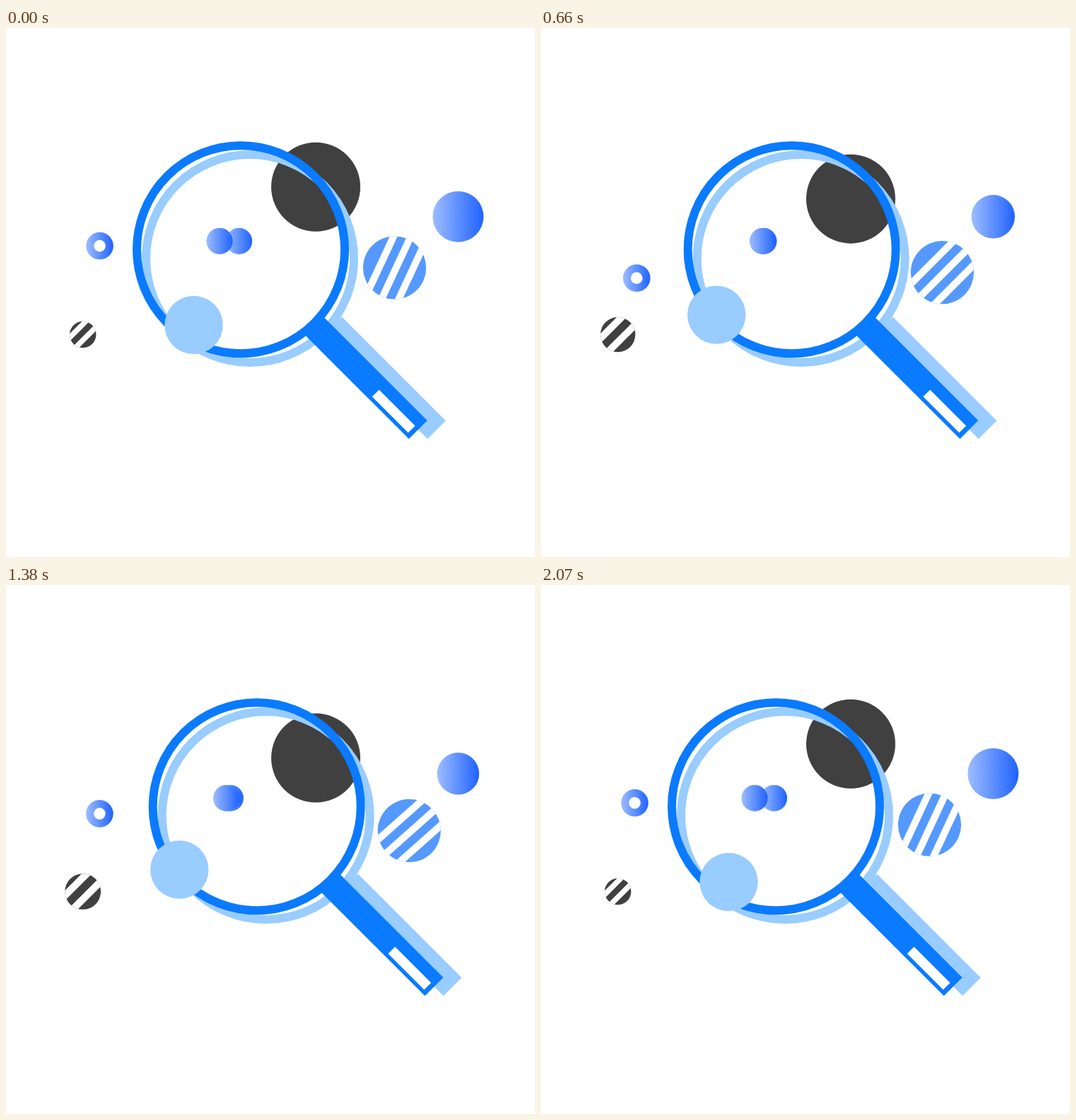
Recreate the animation shown at these times as an HTML page with a canvas. Size 748 px wide and 748 px high, loop 2.1 s.

```html
<!DOCTYPE html>
<html>
<head>
<meta charset="utf-8">
<style>
  html, body { margin: 0; width: 100%; height: 100%; overflow: hidden; background: #fff; }
  canvas { display: block; }
</style>
</head>
<body>
<canvas id="stage" width="748" height="748"></canvas>
<script>
const ctx = document.getElementById('stage').getContext('2d');
const LOOP = 2100, STEP = 30, RAD = Math.PI / 180;
const BLUE = '#0a7aff', LIGHT = '#99ccff', DARK = '#404040', STRIPE = '#5599ff';

const smooth = s => s * s * (3 - 2 * s);
const soft = s => s + s * s - s * s * s; // steady start, gentle arrival

// 0 -> 1 until `up`, holds until `down`, back to 0 at `end`
function pulse(t, up, down, end, ease) {
  const s = Math.min(t / up, (end - t) / (end - down));
  return ease(Math.max(0, Math.min(1, s)));
}

function disc(x, y, r, fill) {
  ctx.fillStyle = fill;
  ctx.beginPath();
  ctx.arc(x, y, r, 0, 7);
  ctx.fill();
}

function ring(x, y, color) {
  ctx.strokeStyle = color;
  ctx.lineWidth = 12;
  ctx.beginPath();
  ctx.arc(x, y, 147, 0, 7);
  ctx.stroke();
}

function poly(fill, ...points) {
  ctx.fillStyle = fill;
  ctx.beginPath();
  points.forEach(p => ctx.lineTo(...p));
  ctx.fill();
}

function ball(x, y, r) {
  const g = ctx.createLinearGradient(x - r, y, x + r, y);
  g.addColorStop(0, '#9dbdff');
  g.addColorStop(1, '#1f62ff');
  disc(x, y, r, g);
}

// Disc with white gaps of one width, starting at the given offsets across the bands
function striped(x, y, r, color, angle, width, offsets) {
  ctx.save();
  disc(x, y, r, color);
  ctx.clip();
  ctx.translate(x, y);
  ctx.rotate(angle);
  ctx.fillStyle = '#fff';
  for (const v of offsets) ctx.fillRect(-r - 2, v, 2 * r + 4, width);
  ctx.restore();
}

function magnifier(dx) {
  ctx.save();
  ctx.translate(dx, 0);
  ring(345, 326, LIGHT);
  poly(LIGHT, [475, 408.5], [621.7, 555.2], [596, 581], [449.3, 434.3]);
  ring(332, 313.2, BLUE);
  poly(BLUE, [449.5, 409], [595.6, 555.1], [569.7, 581], [423.6, 434.9]);
  poly('#fff', [527.5, 511.5], [578.5, 562.5], [568.7, 572.3], [517.7, 521.3]);
  ctx.restore();
}

function draw(t) {
  const s = pulse(t, 1080, 1080, 2070, smooth);
  ctx.fillStyle = '#fff';
  ctx.fillRect(0, 0, 748, 748);

  disc(438, 224.7 + 25.5 * s, 63, DARK);
  ball(639.3, 266.8, 36 - 8 * s);

  // Large striped disc turns around a point below it
  const turn = 30 * RAD * s, c = Math.cos(turn), n = Math.sin(turn);
  striped(539.4 + 10.1 * c + 54.2 * n, 393.2 + 10.1 * n - 54.2 * c, 44.6, STRIPE,
    turn - 65 * RAD, 10, [-25, -3, 19]);

  // Small striped disc grows
  const r = 18.7 + 7.9 * pulse(t, 1080, 1080, 2070, soft);
  striped(108.7, 433.5, r, DARK, -45 * RAD, 0.4 * r, [-0.75 * r, 0.1 * r]);

  // Small ring swings around the lens
  const a = -0.078 + 0.253 * pulse((t + 225) % 2070, 1005, 1005, 2070, smooth);
  const rx = 349.3 - 217 * Math.cos(a), ry = 318 + 217 * Math.sin(a);
  ball(rx, ry, 19.3);
  disc(rx, ry, 8.3, '#fff');

  // Twin balls merge
  const m = pulse(t, 800, 1000, 2070, soft);
  ball(329.5 - 15.5 * m, 301.3, 18.6);
  ball(302 + 12.1 * m, 301.3, 18.6);

  magnifier(30.2 * pulse(t, 980, 1050, 2060, smooth));

  const x = 26 * s;
  disc(265.5 - x, 420 - 0.68 * x - 0.009 * x * x, 41.2, LIGHT);
}

const start = performance.now();
function tick() {
  const t = (performance.now() - start) % LOOP;
  draw(Math.floor(t / STEP) * STEP);
  requestAnimationFrame(tick);
}
tick();
</script>
</body>
</html>
```
